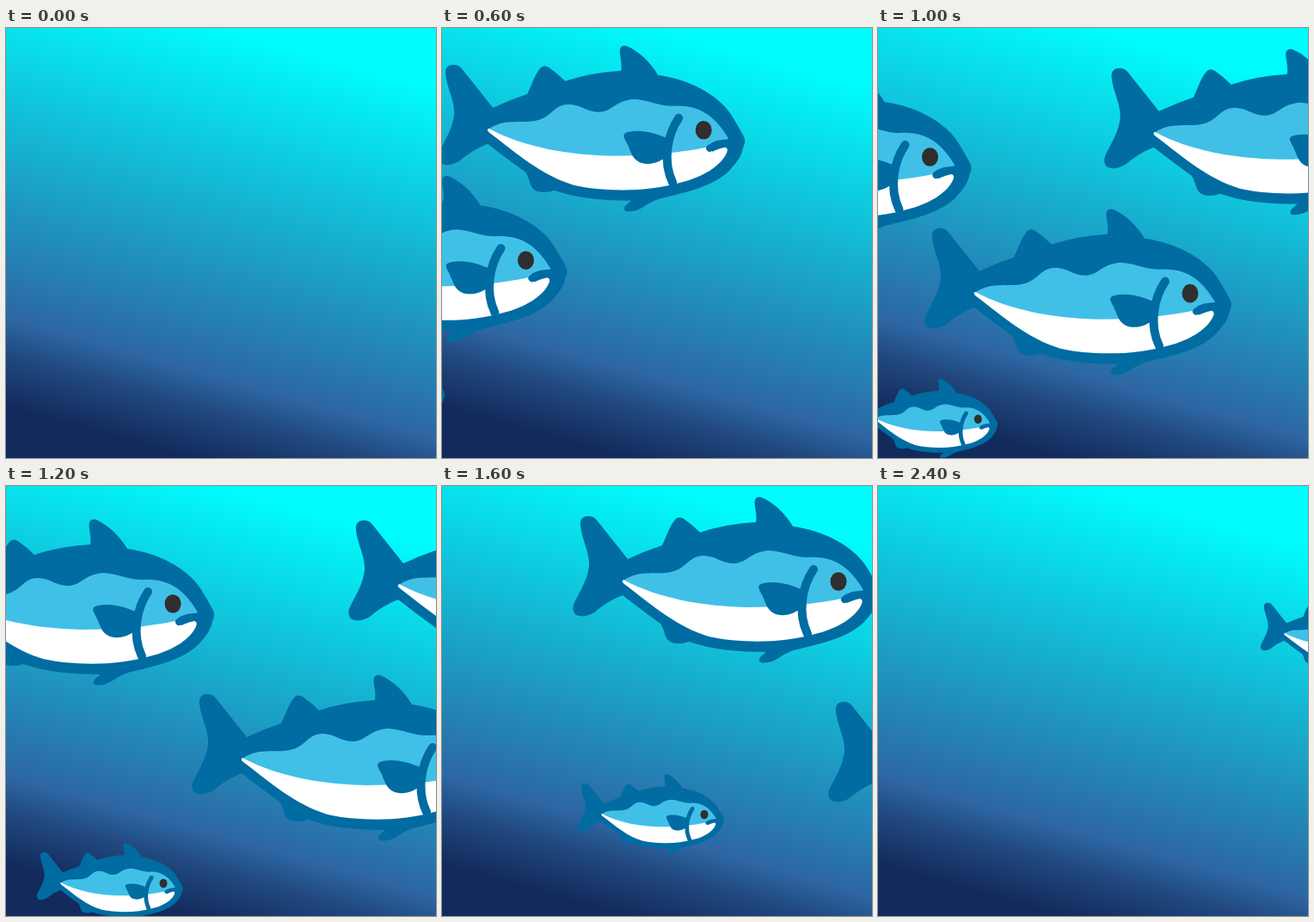
These frames come from a looping animation (500 px wide and 500 px high, 2.6 s). An HTML page:

```html
<!DOCTYPE html>
<html lang="en">
<head>
<meta charset="utf-8">
<title>Swimming fish</title>
<style>
  html, body { margin: 0; width: 100%; height: 100%; overflow: hidden; }
  svg { display: block; width: 100%; height: 100%; }
</style>
</head>
<body>
<svg id="sea" viewBox="0 0 500 500" xmlns="http://www.w3.org/2000/svg">
  <defs>
    <linearGradient id="water" gradientUnits="userSpaceOnUse" x1="0" y1="-70" x2="-132.4" y2="402.9">
      <stop offset="0" stop-color="#00fcfc"/>
      <stop offset=".8" stop-color="#2d66a3"/>
      <stop offset=".88" stop-color="#21497f"/>
      <stop offset="1" stop-color="#132a5c"/>
    </linearGradient>
    <!-- The eye sits at (437, 126) and anchors the fish. -->
    <g id="fish" transform="translate(-437 -126)">
      <path fill="#006ca2" d="M137 61C136 54 140 50 146 50C151 50 154 52 157 56L192 100
        Q211 91 232 84C237 74 241 60 248 53Q252 50 257 53Q267 60 276 69Q306 59 341 57
        C343 47 338 37 340 31Q342 27 347 28C362 34 376 48 384 62C420 67 453 84 469 108
        Q477 121 483 132Q487 139 483 146C482 155 476 163 467 173C448 192 414 199 385 206
        Q374 210 366 216Q355 222 346 220Q343 217 347 213L353 208
        C319 208 289 205 263 196Q253 200 243 197C234 193 236 184 230 175
        Q209 160 186 142Q168 149 153 162Q141 169 132 165Q127 161 129 153
        C134 141 145 126 147 108C148 92 138 76 137 61Z"/>
      <path fill="#40c0e7" d="M187 125C202 114 218 117 235 116C262 114 260 96 281 96
        C296 97 301 105 316 105C332 104 334 91 357 90C374 91 384 98 402 98
        C434 96 452 112 466 136L440 149L400 170H280Q230 155 187 125Z"/>
      <path fill="#fff" d="M187 124C228 146 280 155 332 156C374 156 412 152 440 146
        L447 151Q456 147 462 146Q466 147 464 152C458 167 436 181 410 187
        C373 198 322 198 286 190C248 178 222 155 188 129Q184 126 187 124Z"/>
      <path fill="#006ca2" d="M344 133Q344 129 350 128C367 125 382 130 398 137
        L396 155C387 163 378 166 369 165C352 163 353 148 346 138Z"/>
      <g fill="none" stroke="#006ca2" stroke-linecap="round">
        <path stroke-width="10" d="M408 112C395 131 389 162 401 187"/>
        <path stroke-width="8" d="M444 147C453 139 463 142 478 139"/>
      </g>
      <ellipse cx="437" cy="126" rx="9.5" ry="10.8" fill="#2f2f2f"/>
    </g>
  </defs>
  <rect width="500" height="500" fill="url(#water)"/>
</svg>
<script>
const LOOP = 2600, STEP = 200, GAP = 400;
const sea = document.getElementById('sea');

// Each fish passes its key points GAP ms apart, from `start` on.
const school = [
  { start: 400, scale: 1, path: [[172, 108], [437, 126], [707, 116]] },
  { start: 400, scale: 1, path: [[5, 243], [205, 294], [525, 318], [758, 327]] },
  { start: 1200, scale: 1, path: [[194, 137], [461, 111], [740, 84]] },
  { start: 800, scale: .477, path: [[48, 434], [183, 462], [305, 382], [464, 284], [592, 172]] }
];

for (const fish of school) {
  fish.node = document.createElementNS(sea.namespaceURI, 'use');
  fish.node.setAttribute('href', '#fish');
  sea.append(fish.node);
}

// Key value n; both ends of the path continue in a straight line.
function key(path, n, axis) {
  const last = path.length - 1;
  const at = Math.max(0, Math.min(last, n));
  const from = n < 0 ? 0 : last - 1;
  const slope = path[from + 1][axis] - path[from][axis];
  return path[at][axis] + (n - at) * slope;
}

// Catmull-Rom curve through the key points.
function pointAt(path, pos) {
  const i = Math.floor(pos), k = pos - i;
  return [0, 1].map(axis => {
    const [a, b, c, d] = [-1, 0, 1, 2].map(n => key(path, i + n, axis));
    return b + k / 2 * (c - a + k * (2 * a - 5 * b + 4 * c - d + k * (3 * (b - c) + d - a)));
  });
}

function draw(time) {
  const t = Math.floor(time % LOOP / STEP) * STEP;
  for (const { start, scale, path, node } of school) {
    const [x, y] = pointAt(path, (t - start) / GAP);
    node.setAttribute('transform', `translate(${x} ${y}) scale(${scale})`);
  }
}

const begin = performance.now();
function tick() {
  draw(performance.now() - begin);
  requestAnimationFrame(tick);
}
tick();
</script>
</body>
</html>
```
